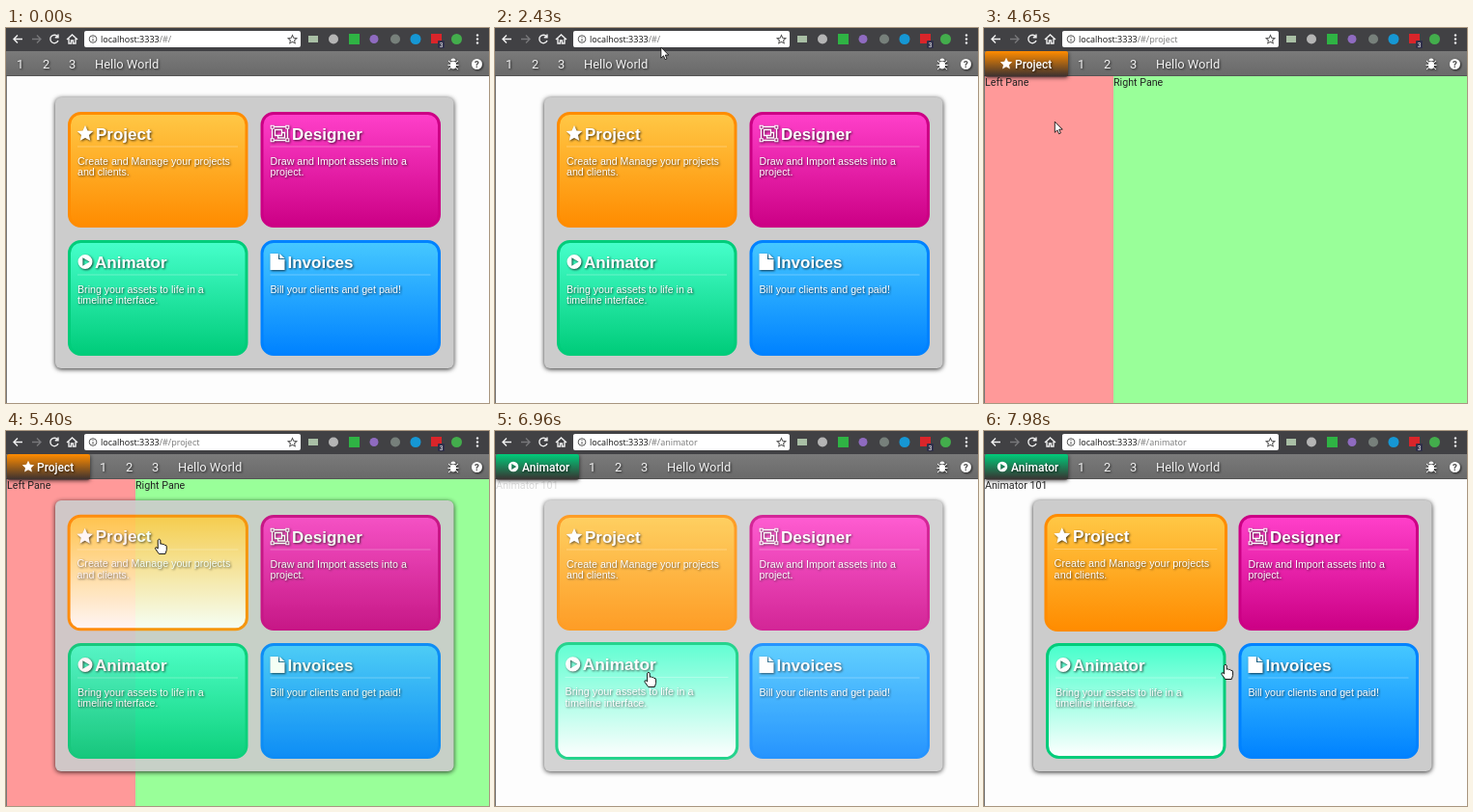
An HTML page that plays this animation: 500x389 px, repeating every 8 s.

```html
<!DOCTYPE html>
<html lang="en">
<head>
<meta charset="utf-8">
<title>Menu navigation</title>
<style>
html, body { margin: 0; width: 100%; height: 100%; overflow: hidden; background: #fdfdfd; }
svg { display: block; width: 500px; height: 389px; }
text { white-space: pre; }
.url { font: 9px "Open Sans", sans-serif; }
.bar, .page { font-family: Roboto, sans-serif; }
.bar { font-size: 12.9px; fill: #f2f2f2; }
.page { font-size: 10.7px; fill: #222; }
.tabname { font: 500 12px Roboto, sans-serif; fill: #fff; }
.title { font: bold 17px "Liberation Sans", Arial, sans-serif; }
.desc { font: 10.65px "Liberation Sans", Arial, sans-serif; }
.shade { filter: drop-shadow(1px 1px .8px rgba(0,0,0,.7)); }
.panel { filter: drop-shadow(0 1px 2.5px rgba(0,0,0,.85)); }
</style>
</head>
<body>
<svg viewBox="0 0 500 389">
  <defs id="defs">
    <linearGradient id="barFill" x2="0" y2="1">
      <stop stop-color="#7a7a7a"/><stop offset="1" stop-color="#696969"/>
    </linearGradient>
    <path id="star" d="M0-8.5 2.5-3.1 8.3-2.5 4 1.5 5.2 7.3 0 4.4-5.2 7.3-4 1.5-8.3-2.5-2.5-3.1Z"/>
    <g id="group" fill="none" stroke="#fff" stroke-width="1.3">
      <path d="M-6-7H6M-6 7H6M-8-5V5M8-5V5"/>
      <path d="M-5-4H2V2H-5ZM2-1H5V4.500H-2V2"/>
      <path d="M-9.300-8.300h3v3h-3zM6.300-8.300h3v3h-3zM-9.300 5.300h3v3h-3zM6.300 5.300h3v3h-3z" stroke-width="1.1"/>
    </g>
    <path id="play" fill-rule="evenodd" d="M-7.500 0a7.500 7.500 0 1 1 15 0a7.500 7.500 0 1 1-15 0ZM-2.600-4.300V4.300L4.600 0Z"/>
    <path id="file" d="M-7.500-8.500H1V-2.500H7.500V8.500H-7.500ZM2.200-8.500 7.500-3.600H2.200Z"/>
  </defs>

  <rect width="500" height="389" fill="#fdfdfd"/>
  <g id="panes">
    <rect x="1" y="50" width="133" height="339" fill="#f99"/>
    <rect x="134" y="50" width="366" height="339" fill="#9f9"/>
    <text class="page" x="1" y="59.500">Left Pane</text>
    <text class="page" x="134" y="59.500">Right Pane</text>
  </g>
  <text id="note" class="page" x="1" y="59.500"></text>
  <path d="M.5 50V389" stroke="#777"/>

  <g id="menu">
    <rect class="panel" x="51" y="72" width="412.500" height="281" rx="6" fill="#ccc"/>
  </g>

  <!-- application bar -->
  <rect y="24" width="500" height="26" fill="url(#barFill)"/>
  <path d="M0 49.500H500" stroke="#555"/>
  <g id="links" class="bar shade">
    <text x="11" y="42">1</text><text x="38" y="42">2</text>
    <text x="65" y="42">3</text><text x="92" y="42">Hello World</text>
  </g>
  <g id="tab">
    <rect id="tabBox" x="1" y="24" width="86" height="26.500" rx="2" style="filter:drop-shadow(0 1px 2px rgba(0,0,0,.7))"/>
    <use id="tabIcon" fill="#fff"/>
    <text id="tabName" class="tabname shade" y="41.500"></text>
  </g>
  <g class="shade" fill="#fff" stroke="#fff">
    <ellipse cx="463" cy="38.500" rx="3" ry="4" stroke="none"/>
    <path d="M460.500 34a2.500 2.500 0 0 1 5 0Z" stroke="none"/>
    <path d="M458 34l3 2.500M468 34l-3 2.500M457.500 38.500h11M458 43l3-2.500M468 43l-3-2.500" fill="none"/>
    <circle cx="487.500" cy="37.500" r="5.500" stroke="none"/>
  </g>
  <text x="487.500" y="41" text-anchor="middle" font-family="Roboto, sans-serif" font-weight="900" font-size="9.500" fill="#555">?</text>

  <!-- browser toolbar -->
  <rect width="500" height="24" fill="#414144"/>
  <g fill="none" stroke="#f0f0f0" stroke-width="1.400">
    <path d="M17 11.500H8M12 7.500 8 11.500 12 15.500"/>
    <path d="M27 11.500H36M32 7.500 36 11.500 32 15.500" stroke="#77777a"/>
    <path d="M53.500 9A4.200 4.200 0 1 0 54 13M54 6.500V9.700H50.800"/>
    <path d="M63 12 68.500 7 74 12M65 11V16H67.500V13H69.500V16H72V11"/>
  </g>
  <rect x="81" y="3" width="224" height="17" rx="2" fill="#fff"/>
  <circle cx="90" cy="11.500" r="3.800" fill="none" stroke="#555"/>
  <path d="M90 11V13.800M90 9V10" stroke="#555"/>
  <text class="url" x="98" y="15" fill="#111">localhost:3333<tspan id="path" fill="#777"></tspan></text>
  <use href="#star" transform="translate(296.500 12) scale(.53)" fill="none" stroke="#555" stroke-width="1.900"/>
  <rect x="313" y="8" width="10" height="7" fill="#a9bfa5"/>
  <circle cx="339" cy="11.500" r="5" fill="#b5b5b5"/>
  <rect x="355" y="6" width="11" height="11" fill="#2fb344"/>
  <circle cx="381" cy="11.500" r="4.500" fill="#8f6bc0"/>
  <circle cx="403" cy="11.500" r="5" fill="#77807b"/>
  <circle cx="424" cy="11.500" r="5.500" fill="#1697d4"/>
  <rect x="440" y="6" width="11" height="10" fill="#d9252a"/>
  <rect x="447" y="13" width="7" height="8" rx="1" fill="#30304a"/>
  <text x="450.500" y="19.500" text-anchor="middle" font-family="Roboto, sans-serif" font-size="6.500" fill="#fff">3</text>
  <circle cx="466.500" cy="11.500" r="5.500" fill="#43ad4c"/>
  <g fill="#eee"><circle cx="488" cy="7.500" r="1.200"/><circle cx="488" cy="11.500" r="1.200"/><circle cx="488" cy="15.500" r="1.200"/></g>

  <g id="cursor" stroke="#000" fill="#fff" stroke-linejoin="round">
    <path id="arrow" stroke-width=".8" d="M.4.400V11.500L3 9.100 4.700 13 6.500 12.200 4.800 8.400H8.300Z"/>
    <path id="hand" stroke-width=".9" d="M-1.400 1.200Q0-.6 1.200 1.200V5.200Q2.500 4.400 3.500 5.600 4.800 5 5.600 6.300 7.600 6 7.600 8V11.500L6.300 15.500H-.3L-4 10.300Q-4.300 8.400-2.800 8.700L-1.400 10Z"/>
  </g>
</svg>
<script>
const LOOP = 8000;
const $ = id => document.getElementById(id);
const clamp = v => Math.max(0, Math.min(1, v));

const tiles = [
  { name: 'Project', x: 64, y: 87, light: '#ffc846', dark: '#ff8c00', icon: 'star', ix: 82, tx: 93,
    lines: ['Create and Manage your projects', 'and clients.'], tab: [23, .75, 32] },
  { name: 'Designer', x: 263.5, y: 87, light: '#ff40ca', dark: '#cc0085', icon: 'group', ix: 283.5, tx: 296,
    lines: ['Draw and Import assets into a', 'project.'], tab: [21, .7, 31] },
  { name: 'Animator', x: 64, y: 220, light: '#46ffcb', dark: '#00cc7a', icon: 'play', ix: 82, tx: 92,
    lines: ['Bring your assets to life in a', 'timeline interface.'], tab: [19, .7, 28] },
  { name: 'Invoices', x: 263.5, y: 220, light: '#46c8ff', dark: '#0082ff', icon: 'file', ix: 281, tx: 291.5,
    lines: ['Bill your clients and get paid!'] }
];
const W = 186.5, H = 120;

const gradient = (id, from, to) => `<linearGradient id="${id}" x2="0" y2="1">
  <stop stop-color="${from}"/><stop offset="1" stop-color="${to}"/></linearGradient>`;

tiles.forEach((tile, i) => {
  const { x, y, light, dark } = tile;
  $('defs').insertAdjacentHTML('beforeend',
    gradient('fill' + i, light, dark) + gradient('hover' + i, light, '#fff') + gradient('tab' + i, dark, '#3a3030'));
  $('menu').insertAdjacentHTML('beforeend', `<g id="tile${i}">
    <rect id="box${i}" x="${x + 1.5}" y="${y + 1.5}" width="${W - 3}" height="${H - 3}" rx="12" stroke="${dark}" stroke-width="3"/>
    <path d="M${x + 10} ${y + 36}H${x + 176}" stroke="#fff" stroke-opacity=".28"/>
    <g class="shade" fill="#fff">
      <use href="#${tile.icon}" x="${tile.ix}" y="${y + 22.5}"/>
      <text class="title" x="${tile.tx}" y="${y + 28.5}">${tile.name}</text>
      ${tile.lines.map((s, n) => `<text class="desc" x="${x + 10}" y="${y + 54.5 + n * 11}">${s}</text>`).join('')}
    </g></g>`);
});

// pointer hotspot: time, x, y
const track = [
  [240, 508, 70], [600, 482, 28], [1020, 455, 85], [1170, 455, 85], [1300, 480, 55], [1470, 455, 88],
  [1530, 423, 102], [1700, 300, 130], [1850, 150, 110], [1950, 110, 58], [1980, 108, 53], [2130, 108, 53],
  [2500, 186, 12], [2700, 75, 12], [2910, 56, 45], [3200, 4, 30], [3400, 80, 50], [3570, 87, 118],
  [3720, 168, 158], [3870, 136, 162], [4170, 136, 162], [4650, 73, 97], [4920, 52, 38], [4980, 53, 37],
  [5220, 53, 37], [5330, 100, 95], [5560, 290, 150], [5680, 290, 150], [6030, 93, 74], [6200, 53, 38],
  [6290, 53, 38], [6600, 140, 245], [6960, 159, 250], [7080, 159, 250], [7500, 53, 38], [7740, 53, 38],
  [7790, 72, 95], [7915, 180, 205], [7980, 250, 242]
];
const opens = [-1000, 5220, 6260, 7740];
const routes = [{ at: 4170, tile: 0 }, { at: 5640, tile: 1 }, { at: 6900, tile: 2 }];
const notes = ['', 'Designer 123.', 'Animator 101'];

function pointer(t) {
  const n = track.findIndex(k => k[0] > t);
  if (n === 0) return [520, 70];
  if (n < 0) return track.at(-1).slice(1);
  const [a, b] = [track[n - 1], track[n]];
  const p = (t - a[0]) / (b[0] - a[0]);
  return [a[1] + (b[1] - a[1]) * p, a[2] + (b[2] - a[2]) * p];
}

function menuAlpha(t) {
  const open = opens.findLast(at => at <= t);
  const shut = routes.findLast(r => r.at <= t);
  return shut && shut.at > open ? 1 - clamp((t - shut.at) / 400) : clamp((t - open) / 200);
}

function hovered(t) {
  if (t < 0 || menuAlpha(t) < .05) return -1;
  const [px, py] = pointer(t);
  return tiles.findIndex(({ x, y }) => px >= x && px <= x + W && py >= y && py <= y + H);
}

// growth trails the pointer by a short delay
function growth(i, t) {
  let sum = 0;
  for (let lag = 60; lag < 180; lag += 10) sum += hovered(t - lag) === i;
  return sum / 12;
}

function draw(t) {
  const route = routes.findLast(r => r.at <= t);
  const page = route ? route.tile : -1;
  const over = hovered(t);

  $('menu').style.opacity = menuAlpha(t);
  tiles.forEach(({ x, y }, i) => {
    const cx = x + W / 2, cy = y + H / 2, s = 1 + .018 * growth(i, t);
    $('tile' + i).setAttribute('transform', `translate(${cx} ${cy}) scale(${s}) translate(${-cx} ${-cy})`);
    $('box' + i).setAttribute('fill', `url(#${i === over ? 'hover' : 'fill'}${i})`);
  });

  const shown = route ? clamp((t - route.at) / 400) : 0;
  $('panes').style.opacity = page === 0 ? shown : 0;
  $('note').style.opacity = shown;
  $('note').textContent = notes[page] || '';
  $('path').textContent = '/#/' + (route ? tiles[page].name.toLowerCase() : '');

  $('tab').style.display = route ? '' : 'none';
  $('links').setAttribute('transform', `translate(${route ? 86 : 0} 0)`);
  if (route) {
    const { name, icon, tab: [ix, scale, tx] } = tiles[page];
    $('tabBox').setAttribute('fill', `url(#tab${page})`);
    $('tabIcon').setAttribute('href', '#' + icon);
    $('tabIcon').setAttribute('transform', `translate(${ix} 37) scale(${scale})`);
    $('tabName').setAttribute('x', tx);
    $('tabName').textContent = name;
  }

  const [px, py] = pointer(t);
  const onTab = route && px < 87 && py > 24 && py < 50;
  const hand = over >= 0 || onTab;
  $('cursor').setAttribute('transform', `translate(${px} ${py})`);
  $('hand').style.display = hand ? '' : 'none';
  $('arrow').style.display = hand ? 'none' : '';
}

const start = performance.now();
function tick() {
  draw((performance.now() - start) % LOOP);
  requestAnimationFrame(tick);
}
tick();
</script>
</body>
</html>
```
